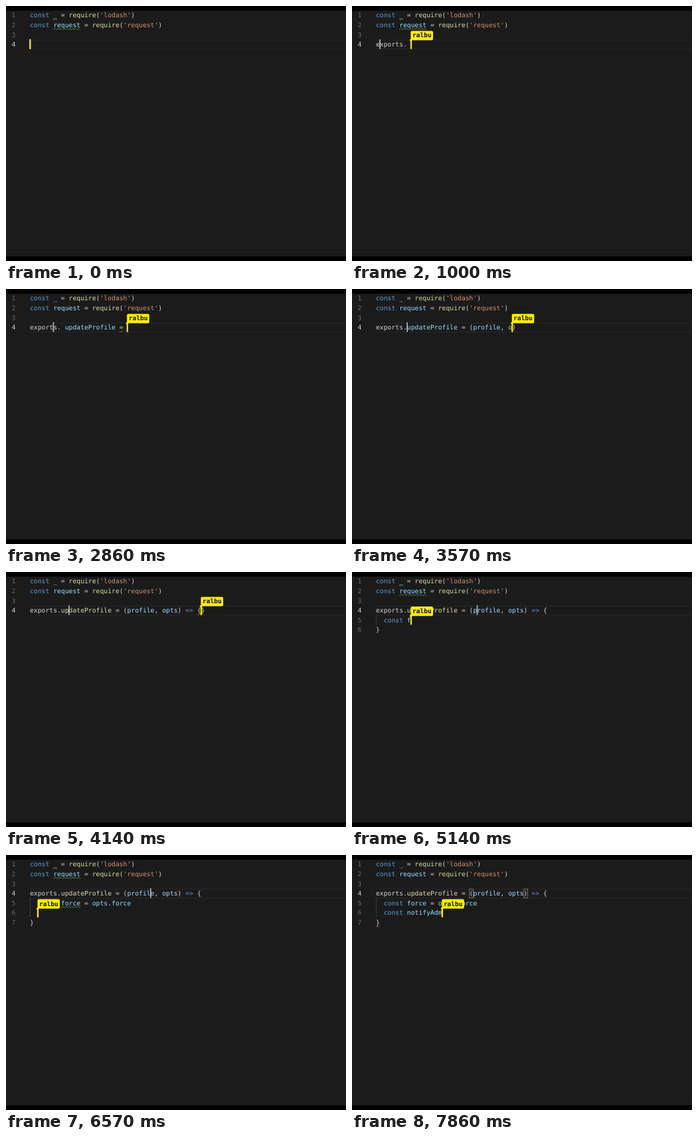
Animation of 512 by 384 pixels, one loop 8 s. Source, as an HTML page with a canvas:

```html
<!DOCTYPE html>
<html lang="en">
<head>
<meta charset="utf-8">
<title>Shared editor</title>
<style>
  html, body { margin: 0; width: 100%; height: 100%; overflow: hidden; background: #000; }
  canvas { display: block; }
</style>
</head>
<body>
<canvas id="stage" width="512" height="384"></canvas>
<script>
const ctx = document.getElementById('stage').getContext('2d');
const LOOP = 8000, FPS = 7;
const CW = 5.858, LH = 14.6, LEFT = 36, TOP = 6.7;
const MONO = '"DejaVu Sans Mono", "Liberation Mono", monospace';
const GUEST = 'ralbu';
const C = {
  bg: '#1b1b1b', text: '#d4d4d4', keyword: '#5f9bd2', name: '#9cdcfe', call: '#dcdcaa',
  string: '#ce9178', gutter: '#6a6a6a', active: '#cccccc', yellow: '#ffee00',
  caret: '#b4b5b3', green: '#5f9c62', red: '#d04a4a', guide: '#3c3c3c', edge: '#292929'
};

const HEADER = ["const _ = require('lodash')", "const request = require('request')", ''];
const SCRIPT = 'exports. updateProfile = (profile, opts) => {\nconst force = opts.force\nconst notifyAdm';

// [tick, value] keys: characters typed by the guest, column of the local caret
const TYPED = [[0, 0], [13, 17], [16, 22], [18, 25], [20, 25], [29, 45], [30, 45],
  [31, 46], [36, 53], [44, 70], [46, 71], [55, 86]];
const CARET = [[0, 0], [6, 0], [13, 6], [22, 6], [24, 9], [25, 8], [29, 10], [30, 10],
  [36, 26], [41, 40], [46, 31], [51, 26], [52, 25], [55, 25]];

// [from, to, line, column]
const ERRORS = [[9, 15, 3, 7], [20, 22, 3, 23], [29, 30, 3, 43], [38, 41, 5, 0], [51, 55, 6, 0]];

const colX = col => LEFT + col * CW;
const lineY = line => TOP + line * LH;
const within = (v, a, b) => v >= a && v <= b;

function sample(keys, tick) {
  const i = Math.max(1, keys.findIndex(key => key[0] >= tick));
  const [t0, a] = keys[i - 1], [t1, b] = keys[i];
  return Math.round(a + (b - a) * (tick - t0) / (t1 - t0));
}

function glyphs(str, x, line, color) {
  ctx.fillStyle = color;
  [...str].forEach((ch, i) => ctx.fillText(ch, x + i * CW, lineY(line) + 10.7));
}

function tokenColor(tok, isFunction) {
  if (tok === 'const' || tok === '=>') return C.keyword;
  if (tok[0] === "'") return C.string;
  if (tok === 'require' || (tok === 'updateProfile' && isFunction)) return C.call;
  if (tok === 'exports') return C.text;
  return /\w/.test(tok) ? C.name : C.text;
}

function codeLine(str, line, isFunction) {
  for (const m of str.matchAll(/'[^']*'|\w+|=>|\S/g)) {
    glyphs(m[0], colX(m.index), line, tokenColor(m[0], isFunction));
  }
}

function squiggle(line, col, count, color) {
  const x0 = colX(col), y = lineY(line) + 13.3;
  ctx.strokeStyle = color;
  ctx.lineWidth = 0.9;
  ctx.beginPath();
  for (let x = 0; x <= count * CW; x += 0.5) {
    ctx.lineTo(x0 + x, y + Math.sin(x * Math.PI / 2.2));
  }
  ctx.stroke();
}

function bracketBox(col) {
  ctx.strokeStyle = '#858585';
  ctx.lineWidth = 0.8;
  ctx.strokeRect(colX(col) + 0.2, lineY(3) + 0.8, CW, LH - 1.2);
}

function guestCaret(line, col, showLabel) {
  const x = colX(col), y = lineY(line);
  ctx.fillStyle = C.yellow;
  ctx.fillRect(x - 0.8, y - 0.5, 2.2, LH + 0.2);
  if (!showLabel) return;
  ctx.fillRect(x - 1.6, y - 0.3, 3, 2.6);
  ctx.beginPath();
  ctx.roundRect(x - 0.3, y - 13.1, 33.6, 14.2, 2);
  ctx.fill();
  ctx.font = `bold 9.5px ${MONO}`;
  ctx.fillStyle = '#111';
  ctx.fillText(GUEST, x + 2.3, y - 3.1);
}

function buildLines(tick, n) {
  const body = SCRIPT.slice(0, n).split('\n');
  const row = body.length - 1;
  let col = body[row].length + (row ? 2 : 0);
  for (let i = 1; i <= row; i++) body[i] = '  ' + body[i];
  if (within(n, 26, 39)) body[0] += ')';
  if (n === 45) body[0] += '}';
  if (tick >= 25) {
    body[0] = body[0].replace('. ', '.');
    if (!row) col--;
  }
  if (row) body.push('}');
  return { lines: HEADER.concat(body), row: row + 3, col };
}

function draw(tick) {
  const n = sample(TYPED, tick), local = sample(CARET, tick);
  const { lines, row, col } = buildLines(tick, n);

  ctx.fillStyle = '#000';
  ctx.fillRect(0, 0, 512, 384);
  ctx.fillStyle = C.bg;
  ctx.fillRect(0, 7, 512, 370);

  ctx.fillStyle = C.edge;
  ctx.fillRect(LEFT, lineY(3) + 0.3, 476, 1);
  ctx.fillRect(LEFT, lineY(4) - 0.7, 476, 1);
  if (row > 3) {
    ctx.fillStyle = C.guide;
    ctx.fillRect(LEFT, lineY(4), 1, (row - 3) * LH);
  }

  ctx.font = `9.73px ${MONO}`;
  lines.forEach((str, i) => {
    glyphs(String(i + 1), 8.6, i, i === 3 ? C.active : C.gutter);
    codeLine(str, i, n >= 43);
  });

  if (tick < 8 || within(tick, 32, 37) || within(tick, 42, 50)) {
    squiggle(0, 6, 1, C.green);
    squiggle(1, 6, 7, C.green);
    if (tick >= 44) squiggle(4, 8, 5, C.green);
  }
  for (const [from, to, line, c] of ERRORS) {
    if (within(tick, from, to)) squiggle(line, c, 1, C.red);
  }
  if (tick > 30 && [24, 25, 38, 39].includes(local)) {
    bracketBox(24);
    bracketBox(38);
  }

  if (tick < 54) {
    ctx.fillStyle = C.caret;
    ctx.fillRect(colX(local) - 0.6, lineY(3) - 0.3, 1.7, LH);
  }
  guestCaret(row, col, tick > 0);
  if (tick === 0) {
    ctx.fillStyle = 'rgba(190,190,180,0.45)';
    ctx.fillRect(colX(0) - 0.2, lineY(3) + 1.5, 1.6, LH - 2);
  }
}

function loop(now) {
  const t = now % LOOP;
  draw(Math.min(55, Math.floor((t + 5) * FPS / 1000)));
  requestAnimationFrame(loop);
}

ctx.textRendering = 'geometricPrecision';
draw(0);
const start = performance.now();
requestAnimationFrame(function first(now) { loop(Math.max(0, now - start)); });
</script>
</body>
</html>
```
